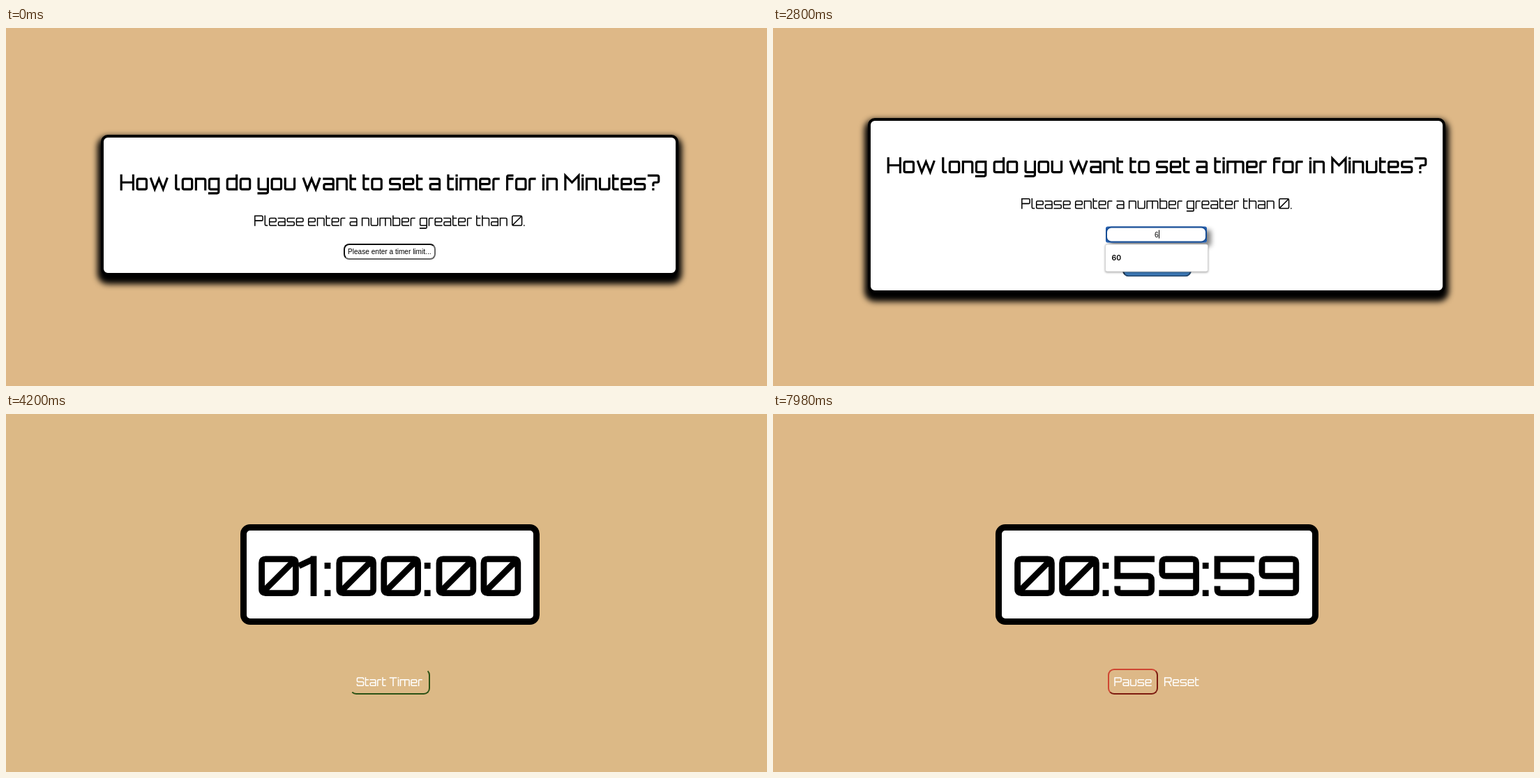
Animation of 1091x513 px, one loop 8 s. Source, as an HTML page:

```html
<!DOCTYPE html>
<html lang="en">
<head>
<meta charset="utf-8">
<title>Countdown timer</title>
<style>
  html, body { margin: 0; width: 100%; height: 100%; overflow: hidden; background: #deb887; }
  body { position: relative; font: 10.1px/20px "Liberation Sans", Arial, sans-serif; color: #000; }
  div, svg { position: absolute; box-sizing: border-box; }
  svg { left: 0; top: 0; width: 1091px; height: 513px; overflow: visible; fill: none; stroke-miterlimit: 3; }
  #form, #timer, #lift { left: 0; top: 0; width: 1091px; height: 513px; }
  #card { left: 136px; width: 828px; background: #fff; border: 4px solid #000; border-radius: 10px;
          box-shadow: 0 7px 9px 5px #000; }
  #set { left: 500.5px; top: 344px; width: 99px; height: 37px; background: #3d7ab8; border-radius: 9px;
         border: 2px solid; border-color: #1a2f48 #24476c #24476c #1a2f48; }
  #field { top: 308.5px; height: 23.5px; background: #fff; border: 2px solid;
           border-color: #111 #666 #666 #111; border-radius: 8px; text-align: center; white-space: nowrap; }
  #ring { top: 308.5px; height: 23.5px; border: 2px solid; border-radius: 3px; }
  #caret { top: 314px; width: 1px; height: 12px; background: #000; }
  #list { left: 476px; top: 333.5px; width: 148px; background: #fff; border: 1px solid #d4d4d4;
          border-radius: 3px; box-shadow: 0 1px 3px rgba(0, 0, 0, .35); overflow: hidden;
          padding: 5px 0 0 8.5px; font: 600 10.5px/28px Inter, sans-serif; white-space: pre; }
  #clock { top: 158px; height: 144px; background: #fff; border: 9px solid #000; border-radius: 14px; }
  #key { top: 365px; height: 37px; border: 2px solid; border-radius: 9px; }
</style>
</head>
<body>
<div id="form">
  <div id="card"></div>
  <div id="lift">
    <div id="set"></div>
    <svg id="ask"></svg>
    <div id="ring"></div>
    <div id="field"></div>
    <div id="caret"></div>
    <div id="list"></div>
  </div>
</div>
<div id="timer">
  <div id="clock"></div>
  <div id="key"></div>
  <svg id="face"></svg>
</div>
<script>
const LOOP = 8000, GAP = 8, SPACE = 21, RADIUS = 7;
const $ = id => document.getElementById(id);

// Square techno lettering: [ink width, strokes, shift], 100 units per em.
// A point is an x (0..1 along the centre line, L/R at the edge) plus a level letter; "!" keeps a corner sharp.
const glyphs = {
  H: [64, "0C 0B|1C 1B|0m 1m"],
  M: [70, "0B 0c! .5m! 1c! 1B"],
  P: [60, "0B 0c! 1c 1m 0m"],
  R: [60, "0B 0c! 1c 1m 0m|.6m 1B"],
  S: [60, "1e 1c 0c 0m 1m 1b 0b 0f"],
  T: [60, "Lc Rc|.5c .5B"],
  a: [52, "Lx 1x 1b! 0b 0n 1n"],
  b: [52, "0C 0b! 1b 1x 0x"],
  d: [52, "1C 1b! 0b 0x 1x"],
  e: [52, "Rb 0b 0x 1x 1n 0n"],
  f: [33, "0B 0c Rc|0x Rx"],
  g: [52, "1b 0b 0x 1x! 1d Ld"],
  h: [52, "0C 0B|0x 1x 1B"],
  i: [0, "0X 0B|0C 0i"],
  l: [22, "0C 0b Rb"],
  m: [80, "0B 0x! 1x 1B|.5x .5B"],
  n: [52, "0B 0x! 1x 1B"],
  o: [52, "0x 1x 1b 0b z"],
  r: [33, "0B 0x Rx"],
  s: [54, "Rx 0x 0n 1n 1b Lb"],
  t: [30, "0C 0b Rb|0x Rx"],
  u: [52, "0X 0b 1b 1X"],
  w: [86, "0X .25b! .5x! .75b! 1X"],
  y: [52, "0X 0b 1b|1X 1d Ld"],
  0: [72, "0c 1c 1b 0b z|0b 1c"],
  1: [32, "1C 1B|Lu 1c", -8],
  5: [72, "Rc 0c! 0m! 1m 1b 0b 0f"],
  9: [72, "1m 0m 0c 1c 1b Lb"],
  "?": [55, "Lc 1c 1m .45m .45q|.45k .45B"],
  ".": [0, "0k 0B"],
  ":": [0, "0k 0B|0g 0h", -2]
};

const levels = s => ({
  C: 72, c: 72 - s / 2, X: 57, x: 57 - s / 2, m: 36, n: 28.5, b: s / 2, B: 0, d: -18 + s / 2,
  i: 72 - s, k: s, e: 54, f: 18, q: 19, u: 54, g: 60, h: 60 - s
});

function trace(pts, closed) {
  const toward = (a, b) => {
    const len = Math.hypot(b.x - a.x, b.y - a.y) || 1, k = Math.min(RADIUS, len / 2) / len;
    return `${a.x + (b.x - a.x) * k} ${a.y + (b.y - a.y) * k}`;
  };
  const n = pts.length;
  let d = "";
  pts.forEach((p, i) => {
    const end = !closed && (i === 0 || i === n - 1);
    const cmd = i ? "L" : "M";
    if (end || p.sharp) d += `${cmd}${p.x} ${p.y}`;
    else d += `${cmd}${toward(p, pts[(i + n - 1) % n])}Q${p.x} ${p.y} ${toward(p, pts[(i + 1) % n])}`;
  });
  return d + (closed ? "Z" : "");
}

// Lettering centred on cx with its baseline at base.
function lettering(text, size, stroke, cx, base, color = "#000") {
  const level = levels(stroke);
  let pen = 0, d = "";
  for (const ch of text) {
    if (ch === " ") { pen += SPACE; continue; }
    const [ink, shape, shift = 0] = glyphs[ch];
    const w = Math.max(ink, stroke), left = pen + GAP / 2 + shift;
    for (const part of shape.split("|")) {
      const pts = [...part.matchAll(/([LR]|[\d.]+)([A-Za-z])(!?)/g)].map(([, x, y, sharp]) => ({
        x: left + (x === "L" ? 0 : x === "R" ? w : stroke / 2 + x * (w - stroke)),
        y: -level[y], sharp
      }));
      d += trace(pts, part.endsWith("z"));
    }
    pen += w + GAP;
  }
  const k = size / 100;
  return `<path role="img" aria-label="${text}" d="${d}" stroke="${color}" stroke-width="${stroke}"
    transform="translate(${cx - pen * k / 2} ${base}) scale(${k})"/>`;
}

$("ask").innerHTML =
  lettering("How long do you want to set a timer for in Minutes?", 31.8, 10, 550.5, 232.7) +
  lettering("Please enter a number greater than 0.", 21.3, 7.2, 549.8, 283.8) +
  lettering("Set Timer", 17.8, 10, 550, 368.8, "#fff");

const button = (text, cx) => lettering(text, 17.7, 8.5, cx, 390, "#fff");
const clock = text => lettering(text, 80, 11, 550.2, 261);
const faces = {
  ready: clock("01:00:00") + button("Start Timer", 549.7),
  running: clock("01:00:00") + button("Pause", 516) + button("Reset", 585.7),
  ticked: clock("00:59:59") + button("Pause", 516) + button("Reset", 585.7)
};

const T = { hover: 1470, list: 2240, six: 2730, leave: 2800, zero: 3430, clock: 4200, press: 6090, run: 6230, tick: 7280 };
const carets = [[1470, 1960], [2240, 3230], [3430, 3920]];
const easeOut = x => 1 - (1 - Math.min(1, Math.max(0, x))) ** 2;
const span = (el, left, width) => { el.style.left = left + "px"; el.style.width = width + "px"; };
const show = (el, on) => { el.style.display = on ? "block" : "none"; };
const put = (el, key, html) => {
  if (el.dataset.key !== key) { el.dataset.key = key; el.innerHTML = html; }
};

function drawForm(t) {
  const typed = t >= T.six;
  const p = easeOut((t - T.hover) / 700) - easeOut((t - T.leave) / 700);
  const left = 484 - 6.7 * p, width = 131.5 + 13.4 * p;
  $("card").style.top = (typed ? 129 : 153) + "px";
  $("card").style.height = (typed ? 251 : 202) + "px";
  $("lift").style.transform = `translateY(${typed ? -24.5 : 0}px)`;
  show($("set"), typed);
  $("ask").lastElementChild.style.display = typed ? "" : "none";

  const field = $("field"), ring = $("ring"), q = p * p;
  span(field, left, width);
  span(ring, left, width);
  field.textContent = t >= T.zero ? "60" : typed ? "6" : "Please enter a timer limit...";
  ring.style.borderColor = `rgba(${30 * q}, ${92 * q}, ${176 * q}, ${Math.min(1, 2 * p)})`;
  field.style.borderColor = p > .05 ? `rgb(${24 * q}, ${78 * q}, ${150 * q})` : "";
  ring.style.boxShadow = `${6 * p}px ${5 * p}px ${8 * p}px rgba(0, 0, 0, ${.5 * p})`;

  $("caret").style.left = (t >= T.zero ? 556 : typed ? 552.5 : 550) + "px";
  show($("caret"), carets.some(([a, b]) => t >= a && t < b));
  show($("list"), t >= T.list && t < T.zero);
  $("list").style.height = (typed ? 40 : 96) + "px";
  $("list").textContent = typed ? "60" : "60\n30\n1";
}

function drawTimer(t) {
  const ticked = t >= T.tick, running = t >= T.run;
  const name = ticked ? "ticked" : running ? "running" : "ready";
  $("timer").style.background = running ? "#ddb887" : "#dcb986";
  span($("clock"), ticked ? 318.5 : 335.5, ticked ? 463 : 429);
  put($("face"), name, faces[name]);
  span($("key"), running ? 480 : 493, running ? 71.5 : 114.5);
  const none = "transparent", green = "#2c5215";
  const [lit, dark] = running ? ["#cf4632", "#7d1c10"] : t >= T.press ? [green, none] : [none, green];
  $("key").style.borderColor = `${lit} ${dark} ${dark} ${lit}`;
}

function frame(now) {
  const t = now % LOOP, counting = t >= T.clock;
  show($("form"), !counting);
  show($("timer"), counting);
  (counting ? drawTimer : drawForm)(t);
  requestAnimationFrame(frame);
}
frame(0);
</script>
</body>
</html>
```
